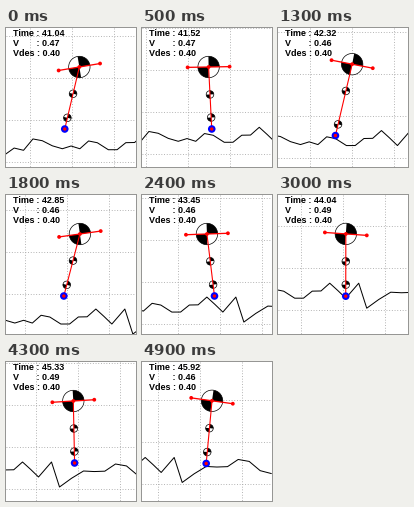
These frames come from a looping animation (130 by 139 pixels, 5 s). A matplotlib script:

```python
import numpy as np
import matplotlib.pyplot as plt
from matplotlib.animation import FuncAnimation
from matplotlib.patches import Circle, Wedge

W, H, DPI = 130, 139, 100
FRAMES, INTERVAL = 50, 100
PX = 72 / DPI                # one pixel in points
SPEED = 2.67                 # forward travel of the body, pixels per frame
GRAVITY = 0.6
SHORT, LONG = 62, 76         # hip height over the foot, landed and pushing off
GRID = 42

# foothold x, y; touchdown and takeoff frame; speed shown from touchdown on
STEPS = [
    (48, 108, -12, -3, 0.47),
    (92, 102, 6, 14, 0.46),
    (154, 110, 27, 38, 0.49),
    (199, 103, 45, 56, 0.46),
]

# frame, simulated time, body tilt in degrees
KEYS = np.array([
    (0, 41.04, 9.5), (5, 41.52, 1), (13, 42.32, -11), (18, 42.85, 8),
    (30, 44.04, -4), (37, 44.73, 15), (49, 45.92, -8),
])

LANDMARKS = np.array([
    (-10, 115), (37, 103), (57, 111), (92, 105), (103, 112), (138, 97),
    (154, 112), (167, 97), (175, 122), (199, 106), (231, 99), (275, 112),
])


def smooth(p):
    return p * p * (3 - 2 * p)


def make_terrain():
    """Landmarks joined by rough ground."""
    rng = np.random.default_rng(4)
    points = []
    for (x0, y0), (x1, y1) in zip(LANDMARKS, LANDMARKS[1:]):
        count = max(1, round((x1 - x0) / 10))
        for i in range(count):
            p = i / count
            bump = rng.uniform(-5, 5) if i else 0
            points.append((x0 + p * (x1 - x0), y0 + p * (y1 - y0) + bump))
    return np.array(points)


TERRAIN = make_terrain()


def gait(n):
    """World foot x, world hip y, hip height over the foot, shown speed."""
    k = max(i for i, step in enumerate(STEPS) if n >= step[2])
    x, y, land, leave, speed = STEPS[k]
    if n < leave:
        push = ((n - land) / (leave - land)) ** 3
        height = SHORT + (LONG - SHORT) * push
        return x, y - height, height, speed
    next_x, next_y, next_land = STEPS[k + 1][:3]
    t, span = n - leave, next_land - leave
    p = t / span
    start, end = y - LONG, next_y - SHORT
    hip = start + (end - start) * p - GRAVITY / 2 * t * (span - t)
    height = SHORT + (LONG - SHORT) * max(0, 1 - 4 * p) ** 2
    return x + (next_x - x) * smooth(p), hip, height, speed


fig = plt.figure(figsize=(W / DPI, H / DPI), dpi=DPI, facecolor="white")
ax = fig.add_axes([0, 0, 1, 1])


def line(x, y, color, width, **style):
    ax.plot(x, y, color=color, lw=width * PX, **style)


def disc(x, y, r, color, z=6):
    ax.add_patch(Circle((x, y), r, fc=color, ec="none", zorder=z))


def mass_mark(center, r, angle):
    """Centre-of-mass symbol: a circle with two black quadrants."""
    ax.add_patch(Circle(center, r, fc="white", ec="black", lw=0.7 * PX,
                        zorder=4))
    for start in (90, 270):
        ax.add_patch(Wedge(center, r, start + angle, start + 90 + angle,
                           fc="black", ec="none", zorder=4))


def draw_grid(scroll, drop):
    style = dict(color="#a8a8a8", width=0.9, dashes=(1, 2), zorder=1)
    for x in np.arange((25 - scroll) % GRID, W, GRID):
        line([x, x], [0, H], **style)
    for y in np.arange((40 + drop) % GRID, H, GRID):
        line([0, W], [y, y], **style)


def draw_robot(body, foot, tilt):
    leg = foot - body
    unit = leg / np.hypot(*leg)
    leg_angle = np.degrees(np.arctan2(leg[1], leg[0])) - 90
    a = np.radians(tilt)
    arm = 21 * np.array([np.cos(a), -np.sin(a)])
    ends = np.array([body - arm, body + arm])

    mass_mark(body, 10.7, -tilt)
    mass_mark(body + 27.5 * unit, 3.8, leg_angle)
    mass_mark(foot - 11.5 * unit, 3.8, leg_angle)
    line([body[0], foot[0]], [body[1], foot[1]], "red", 1.1, zorder=5)
    line(ends[:, 0], ends[:, 1], "red", 1.3, zorder=5)
    for x, y in [*ends, body]:
        disc(x, y, 1.9, "red")
    disc(*foot, 3.8, "blue")
    disc(*foot, 1.7, "red", 7)


def draw_text(time, speed):
    rows = (f"Time : {time:.2f}", f"V       : {speed:.2f}", "Vdes : 0.40")
    for i, row in enumerate(rows):
        ax.text(7, 8 + 10 * i, row, family="Liberation Sans", weight="bold",
                size=9 * PX, color="black", va="baseline", zorder=8)


def update(n):
    ax.clear()
    ax.set(xlim=(0, W), ylim=(H, 0))
    ax.axis("off")

    foot_x, hip_y, height, speed = gait(n)
    time, tilt = (np.interp(n, KEYS[:, 0], KEYS[:, i]) for i in (1, 2))
    body_x = 74 + SPEED * n
    reach = foot_x - body_x

    # The camera stays near the middle of the leg.
    body = np.array([67.8 - 0.38 * reach, 39 - 0.3 * (height - SHORT)])
    foot = body + (reach, height)
    scroll, drop = body_x - body[0], body[1] - hip_y

    draw_grid(scroll, drop)
    line(TERRAIN[:, 0] - scroll, TERRAIN[:, 1] + drop, "black", 1, zorder=3)
    draw_robot(body, foot, tilt)
    draw_text(time, speed)
    return []


anim = FuncAnimation(fig, update, frames=FRAMES, interval=INTERVAL,
                     init_func=lambda: [], repeat=True, repeat_delay=0)
plt.show()
```
